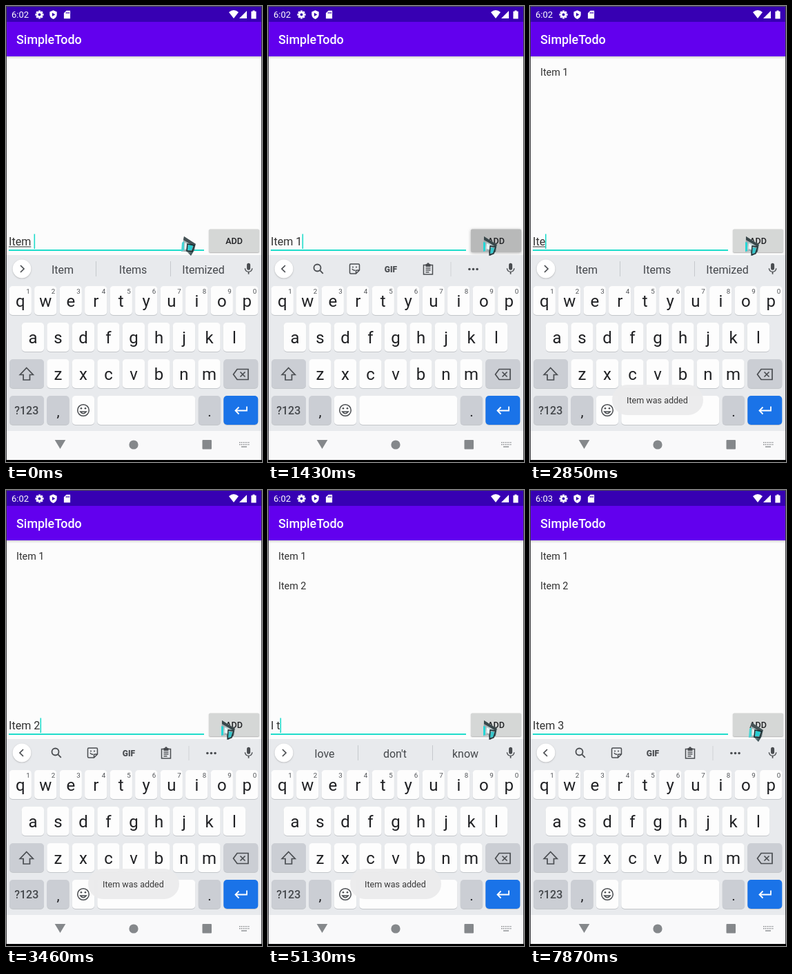
Write an HTML page with a canvas that moves like this. It is 371 px wide and 661 px high and loops after 8 s.

```html
<!DOCTYPE html>
<html lang="en">
<head>
<meta charset="utf-8">
<title>Todo list demo</title>
<style>
html, body { margin: 0; width: 100%; height: 100%; overflow: hidden; background: #000; }
canvas { display: block; }
</style>
</head>
<body>
<canvas id="stage" width="371" height="661"></canvas>
<script>
const ctx = document.getElementById('stage').getContext('2d');
const LOOP = 8000;
const INK = '#202124', ICON = '#4a4d51', TEAL = '#1fdccb';

// Each entry changes part of the screen state from its time onwards.
const timeline = [
  [0, { text: 'Item ', mark: 'Item', caret: true, words: ['Item', 'Items', 'Itemized'], tools: false,
        items: 0, pressed: false, toast: 0, clock: '6:02', x: 253, y: 334, turned: false }],
  [130, { text: 'Item 1', mark: '', words: [] }],
  [420, { tools: true }],
  [690, { caret: false }],
  [840, { x: 272 }],
  [980, { x: 297 }],
  [1120, { x: 311, turned: true, caret: true }],
  [1430, { pressed: true }],
  [1570, { text: '', items: 1 }],
  [1720, { pressed: false, toast: .35 }],
  [1860, { toast: .8 }],
  [2010, { toast: 1 }],
  [2310, { text: 'I' }],
  [2450, { tools: false, words: ['I', "I'm", "I'll"] }],
  [2570, { text: 'It' }],
  [2850, { text: 'Ite', mark: 'Ite', words: ['Item', 'Items', 'Itemized'] }],
  [3000, { text: 'Item ', mark: 'Item' }],
  [3160, { text: 'Item 2', mark: '', words: [] }],
  [3460, { tools: true }],
  [3600, { toast: .7 }],
  [3730, { toast: .35, caret: false }],
  [3860, { toast: 0 }],
  [4130, { pressed: true, caret: true }],
  [4270, { text: '', items: 2 }],
  [4420, { pressed: false, toast: .35 }],
  [4560, { toast: .8 }],
  [4700, { toast: 1, text: 'I' }],
  [4850, { text: 'I ', tools: false, words: ['love', "don't", 'know'] }],
  [5130, { text: 'I t' }],
  [5270, { text: 'I te' }],
  [5400, { text: 'I tem' }],
  [5540, { text: 'Item ', words: ['for', 'is', 'in'] }],
  [5820, { text: 'Item 3' }],
  [5960, { clock: '6:03' }],
  [6360, { toast: .6 }],
  [6500, { toast: .25 }],
  [6630, { toast: 0 }],
  [6750, { tools: true, caret: false }],
  [7190, { caret: true }],
  [7750, { caret: false, x: 314, y: 335, turned: false }],
  [7870, { x: 316, y: 337 }]
];

function stateAt(t) {
  const state = {};
  for (const [start, change] of timeline) if (start <= t) Object.assign(state, change);
  return state;
}

function rect(x, y, w, h, color) {
  ctx.fillStyle = color;
  ctx.fillRect(x, y, w, h);
}

function rounded(x, y, w, h, r, color) {
  ctx.fillStyle = color;
  ctx.beginPath();
  ctx.roundRect(x, y, w, h, r);
  ctx.fill();
}

function disc(x, y, r, color) {
  ctx.fillStyle = color;
  ctx.beginPath();
  ctx.arc(x, y, r, 0, 7);
  ctx.fill();
}

function label(str, x, y, size, color, align = 'left', weight = 400) {
  ctx.font = `${weight} ${size}px Roboto, sans-serif`;
  ctx.textAlign = align;
  ctx.fillStyle = color;
  ctx.fillText(str, x, y);
  return ctx.measureText(str).width;
}

// Path relative to (x, y); stroked when a width is given, otherwise filled.
function icon(d, x, y, color, width = 0, scale = 1) {
  ctx.save();
  ctx.translate(x, y);
  ctx.scale(scale, scale);
  const path = new Path2D(d);
  if (width) {
    ctx.lineWidth = width;
    ctx.strokeStyle = color;
    ctx.stroke(path);
  } else {
    ctx.fillStyle = color;
    ctx.fill(path, 'evenodd');
  }
  ctx.restore();
}

function statusBar(clock) {
  rect(0, 0, 371, 23, '#3700b3');
  label(clock, 8, 17, 13, '#fff');
  ctx.fillStyle = '#fff';
  for (let i = 0; i < 4; i++) {
    ctx.save();
    ctx.translate(48.5, 12.5);
    ctx.rotate(i * Math.PI / 4);
    ctx.fillRect(-1.5, -6, 3, 12);
    ctx.restore();
  }
  disc(48.5, 12.5, 4.4, '#fff');
  disc(48.5, 12.5, 1.9, '#3700b3');
  icon('M0-6.2L5.2-4V0C5.2 3 3 5.4 0 6.4C-3 5.4-5.2 3-5.2 0V-4zM-1.6-2.8V2.6L2.9-.1z', 68.5, 12.5, '#fff');
  icon('M-1-5.8H4.6V5.8H-4.6V-2.2zM-1.7-3.8V-1.4H-.6V-3.8zM.3-3.8V-1.4H1.4V-3.8zM2.2-3.8V-1.4H3.3V-3.8z',
    88.5, 12.5, '#fff');
  icon('M-7-3Q0-9 7-3L0 6z', 330, 12, '#fff');
  icon('M5.5-5.5V5.5H-5.5z', 343.5, 12.5, '#fff');
  icon('M-1.5-6H1.5V-4.8H3.6V6H-3.6V-4.8H-1.5z', 359, 12.5, '#fff');
}

function page(s) {
  rect(0, 0, 371, 661, '#fcfcfc');
  rect(0, 23, 371, 50, '#6200ee');
  const shade = ctx.createLinearGradient(0, 73, 0, 77);
  shade.addColorStop(0, 'rgba(0,0,0,.16)');
  shade.addColorStop(1, 'rgba(0,0,0,0)');
  rect(0, 73, 371, 4, shade);
  statusBar(s.clock);
  label('SimpleTodo', 15, 55, 17.9, '#fff', 'left', 500);
  for (let i = 0; i < s.items; i++) label('Item ' + (i + 1), 15, 100.5 + i * 43, 14.35, '#303030');

  const end = 4 + label(s.text, 4, 347, 16.1, '#303030');
  if (s.mark) rect(4, 348.5, ctx.measureText(s.mark).width, 1, '#303030');
  rect(4, 353, 283, 2, TEAL);
  if (s.caret) rect(Math.round(end * 2) / 2, 330.5, 1.6, 21.5, TEAL);

  ctx.save();
  ctx.shadowColor = 'rgba(0,0,0,.3)';
  ctx.shadowBlur = s.pressed ? 4 : 1.5;
  ctx.shadowOffsetY = 1;
  rounded(294, 323.5, 73, 33.5, 2, s.pressed ? '#b8b9b9' : '#d5d7d6');
  ctx.restore();
  label('ADD', 330.5, 344.5, 12.56, INK, 'center', 500);
}

function toolbar() {
  icon('M4 0A5 5 0 1 1-6 0A5 5 0 1 1 4 0M2.7 3.7L7.3 8.3', 72.5, 379.5, ICON, 1.8);
  icon('M-5.5-7H5.5Q7-7 7-5.5V2L2 7H-5.5Q-7 7-7 5.5V-5.5Q-7-7-5.5-7zM7 2H3.5Q2 2 2 3.5V7M-3.5 0Q-2 3 1 2',
    125.5, 381, ICON, 1.5);
  disc(123, 378.5, 1, ICON);
  disc(128, 378.5, 1, ICON);
  label('GIF', 178, 385.5, 12, ICON, 'center', 900);
  icon('M-6.5-6H6.5V7.5H-6.5zM-3.5-1.5H3.5M-3.5 1.3H3.5M-3.5 4.2H1.5', 232, 381.5, ICON, 1.5);
  rect(228.5, 374, 7, 4, ICON);
  disc(232, 374, 1.8, ICON);
  rect(264.5, 371, 1, 21, '#cfd2d6');
  for (let i = -1; i < 2; i++) disc(297.5 + i * 5.6, 381.5, 1.8, ICON);
}

function suggestions(words) {
  words.forEach((word, i) => label(word, 82 + i * 102, 387.5, 16, '#45484c', 'center'));
  rect(130, 370, 1, 22, '#c6c9cd');
  rect(238, 370, 1, 22, '#c6c9cd');
}

function key(x, y, w, color = '#fdfdfd') {
  rounded(x, y + 1, w, 42, 5, '#c3c6ca');
  rounded(x, y, w, 42, 5, color);
}

function keyRow(letters, x, y, hints) {
  [...letters].forEach((ch, i) => {
    const left = x + i * 36.5;
    key(left, y, 32.3);
    label(ch, left + 16.2, y + 29.5, 24, INK, 'center');
    if (hints) label(hints[i], left + 27.5, y + 11, 9.8, '#505357', 'center');
  });
}

function keyboard(s) {
  rect(0, 361, 371, 255, '#e8eaed');
  ctx.save();
  ctx.shadowColor = 'rgba(0,0,0,.25)';
  ctx.shadowBlur = 2;
  ctx.shadowOffsetY = .7;
  disc(23, 381, 13.4, '#fff');
  ctx.restore();
  icon(s.tools ? 'M2-5L-3 0L2 5' : 'M-2-5L3 0L-2 5', 23, 381, ICON, 1.7);
  if (s.tools) toolbar(); else suggestions(s.words);
  icon('M12 14a3 3 0 0 0 3-3V5a3 3 0 0 0-6 0v6a3 3 0 0 0 3 3zm5.3-3a5.3 5.3 0 0 1-10.6 0H5a7 7 0 0 0 6 6.7V21h2v-3.3a7 7 0 0 0 6-6.7z',
    341.5, 371, ICON, 0, .84);

  const grey = '#cbced4';
  keyRow('qwertyuiop', 4.6, 406, '1234567890');
  keyRow('asdfghjkl', 22.8, 459);
  keyRow('zxcvbnm', 59.3, 512);
  key(5, 512, 50, grey);
  icon('M0-9L9.5 1H4.7V8.5H-4.7V1H-9.5z', 29.8, 533.5, ICON, 1.7);
  key(315.3, 512, 50, grey);
  icon('M-5-7.5H11V7.5H-5L-10.5 0zM-.5-3.5L6.5 3.5M6.5-3.5L-.5 3.5', 340, 534, ICON, 1.7);

  key(5, 565, 50, grey);
  label('?123', 29.7, 592, 16, '#45484c', 'center', 500);
  key(59.3, 565, 32.3, grey);
  label(',', 75.5, 595, 21, INK, 'center');
  key(95.8, 565, 32.3);
  icon('M8.3 0A8.3 8.3 0 1 1-8.3 0A8.3 8.3 0 1 1 8.3 0M-4.3 2Q0 7.5 4.3 2z', 112, 586, ICON, 1.5);
  disc(109, 583.3, 1.3, ICON);
  disc(115, 583.3, 1.3, ICON);
  key(132.3, 565, 142);
  key(278.8, 565, 32.3, grey);
  label('.', 295, 595, 21, INK, 'center');
  key(315.3, 565, 50, '#1a73e8');
  icon('M8.5-5V1H-8M-3-4L-8 1L-3 6', 340.5, 585.5, '#fff', 1.8);
}

function navBar() {
  const grey = '#85888b';
  rect(0, 616, 371, 42, '#f9f9fa');
  icon('M-7.8-6.5H7.8L0 6.5z', 78.5, 635.5, grey);
  disc(185, 636, 6.6, grey);
  rounded(284.5, 629, 13.5, 13.5, 1, grey);
  for (let i = 0; i < 6; i++) {
    rect(338 + i * 2.6, 632, 1.4, 1.4, grey);
    rect(338 + i * 2.6, 635, 1.4, 1.4, grey);
  }
  rect(341, 638.3, 8, 1.3, grey);
}

function toast(alpha) {
  if (!alpha) return;
  ctx.save();
  ctx.globalAlpha = alpha;
  rounded(119, 549, 132, 44, 22, 'rgba(236,236,237,.97)');
  label('Item was added', 140, 576, 12.56, '#3a3a3a');
  ctx.restore();
}

function pointer(x, y, turned) {
  ctx.save();
  ctx.translate(x, y);
  const sheen = ctx.createLinearGradient(0, 0, 20, 26);
  sheen.addColorStop(0, '#738083');
  sheen.addColorStop(.5, '#c6d3d5');
  sheen.addColorStop(1, '#23393d');
  if (turned) {
    icon('M2 0L21 12L19 22L11 28L8 21L1 23z', 0, 0, sheen);
    icon('M2 0L21 12L19 15L2 5z', 0, 0, '#39474a');
    icon('M1 8L4 9V21L1 22z', 0, 0, '#25d6d6');
    icon('M6 10L10 12V19L6 18z', 0, 0, '#e9f7f7');
    icon('M12 16L17 17L15 24L11 25z', 0, 0, '#35c7cc');
    icon('M11 14L19 15L16 25L10 27z', 0, 0, '#182b2f', 1.3);
  } else {
    icon('M5 0L22 11L20 20L15 28L9 22L1 22z', 0, 0, sheen);
    icon('M5 0L22 11L20 15L4 5z', 0, 0, '#455255');
    icon('M2 9L5 7V20L1 22z', 0, 0, '#45d5d4');
    icon('M6 9L10 11V18L6 19z', 0, 0, '#e6eeee');
    icon('M11 12L18 13L16 20L10 20z', 0, 0, '#29cdd2');
    icon('M10 11L20 13L17 22L9 21z', 0, 0, '#14282c', 1.5);
  }
  ctx.restore();
}

function frameEdges() {
  rect(0, 0, 371, 1, '#4c4c55');
  rect(0, 0, 1, 661, '#3c3c40');
  rect(370, 0, 1, 661, '#3c3c40');
  rect(0, 658, 371, 3, '#000');
}

function draw(now) {
  const s = stateAt(now % LOOP);
  page(s);
  keyboard(s);
  navBar();
  toast(s.toast);
  frameEdges();
  pointer(s.x, s.y, s.turned);
}

const begin = performance.now();
function tick() {
  draw(performance.now() - begin);
  requestAnimationFrame(tick);
}
tick();
</script>
</body>
</html>
```
